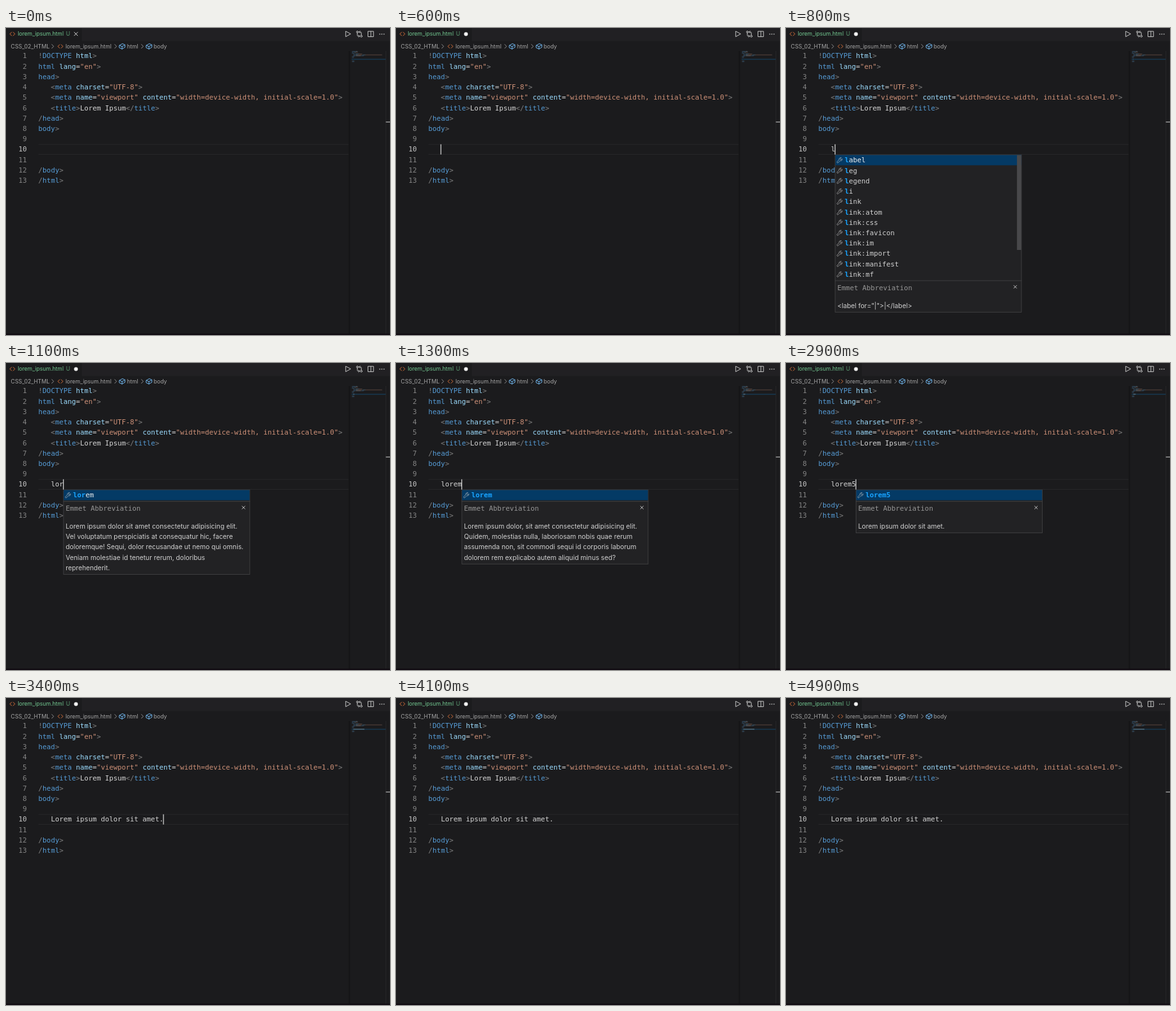
Write an HTML page that moves like this. It is 600 px wide and 480 px high and loops after 5000 ms.

```html
<!DOCTYPE html>
<html lang="en">
<head>
<meta charset="UTF-8">
<title>Editor typing loop</title>
<style>
html, body { margin: 0; width: 100%; height: 100%; overflow: hidden; background: #1b1b1d; }
svg { display: block; width: 600px; height: 480px; }
text { white-space: pre; }
.mono { font: 10.82px "DejaVu Sans Mono", monospace; }
.ui { font: 8.63px Inter, sans-serif; }
.doc { font: 10.3px Inter, sans-serif; fill: #d0d0d0; }
.line { fill: none; stroke-width: 1; stroke-linejoin: round; stroke-linecap: round; }
</style>
</head>
<body>
<svg id="stage" viewBox="0 0 600 480" xmlns="http://www.w3.org/2000/svg"></svg>
<script>
const NS = "http://www.w3.org/2000/svg";
const stage = document.getElementById("stage");
const LOOP = 5000, CHAR = 6.514, ROW = 16.22, LEFT = 50.6, BASE = 47.4, INDENT = 3;
const COLORS = { g: "#808080", b: "#569cd6", a: "#9cdcfe", s: "#ce9178", t: "#d4d4d4" };

// First character of each token selects its colour.
const CODE = [
  ["g!", "bDOCTYPE", "a html", "g>"],
  ["bhtml", "a lang", "t=", 's"en"', "g>"],
  ["bhead", "g>"],
  ["g   <", "bmeta", "a charset", "t=", 's"UTF-8"', "g>"],
  ["g   <", "bmeta", "a name", "t=", 's"viewport"', "a content", "t=",
    's"width=device-width, initial-scale=1.0"', "g>"],
  ["g   <", "btitle", "g>", "tLorem Ipsum", "g</", "btitle", "g>"],
  ["g/", "bhead", "g>"],
  ["bbody", "g>"],
  [], [], [],
  ["g/", "bbody", "g>"],
  ["g/", "bhtml", "g>"]
];

const TAGS = ["label", "leg", "legend", "li", "link", "link:atom", "link:css", "link:favicon",
  "link:im", "link:import", "link:manifest", "link:mf"];
const LONG = [
  "Lorem ipsum dolor sit amet consectetur adipisicing elit.",
  "Vel voluptatum perspiciatis at consequatur hic, facere",
  "doloremque! Sequi, dolor recusandae ut nemo qui omnis.",
  "Veniam molestiae id tenetur rerum, doloribus",
  "reprehenderit."
];
const MEDIUM = [
  "Lorem ipsum dolor, sit amet consectetur adipisicing elit.",
  "Quidem, molestias nulla, laboriosam nobis quae rerum",
  "assumenda non, sit commodi sequi id corporis laborum",
  "dolorem rem explicabo autem aliquid minus sed?"
];
const SHORT = "Lorem ipsum dolor sit amet.";

// Typing steps; blink is the moment the caret's blink cycle starts.
const STEPS = [
  { at: 0, blink: -800, col: 0, text: "" },
  { at: 600, col: INDENT, text: "" },
  { at: 700, text: "l", items: TAGS, doc: ['<label for="|">|</label>'] },
  { at: 1000, text: "lo", items: ["lorem"], doc: LONG },
  { at: 1100, text: "lor", items: ["lorem"], doc: LONG },
  { at: 1200, text: "lore", items: ["lorem"], doc: LONG },
  { at: 1300, text: "lorem", items: ["lorem"], doc: MEDIUM },
  { at: 1900, text: "lorem5", items: ["lorem5"], doc: [SHORT] },
  { at: 3200, text: SHORT }
];

function add(parent, tag, attrs, content) {
  const el = document.createElementNS(NS, tag);
  for (const key in attrs) el.setAttribute(key, attrs[key]);
  if (content !== undefined) el.textContent = content;
  parent.appendChild(el);
  return el;
}
const rect = (p, x, y, width, height, fill) => add(p, "rect", { x, y, width, height, fill });
const path = (p, d, stroke, extra) => add(p, "path", { class: "line", d, stroke, ...extra });
const write = (p, x, y, cls, fill, str) => add(p, "text", { x, y, class: cls, fill }, str);

function codeIcon(x, y) {
  path(stage, `M${x - 1.3} ${y - 2.7}l-2.6 2.7 2.6 2.7M${x + 1.3} ${y - 2.7}l2.6 2.7-2.6 2.7`, "#d9713a");
}
function chevron(x) {
  path(stage, `M${x - 1.4} 25.7l2.9 3-2.9 3`, "#8c8c8c", { "stroke-width": 0.9 });
}
function cube(x) {
  path(stage, `M${x - 4.2} 27.2l4.6-2.7 4 1.9v3.7l-4.6 2.8-4-2zl4 1.9 4.6-2.7M${x - 0.2} 29.1v3.8`,
    "#6fb5ec", { "stroke-width": 0.9 });
}
function cross(p, x, y, r, color) {
  return path(p, `M${x - r} ${y - r}l${2 * r} ${2 * r}m0 ${-2 * r}l${-2 * r} ${2 * r}`, color);
}
function wrench(p, x, y) {
  path(p, "M10.5 1.5a4 4 0 0 0-3.8 5.3L1.8 11.7a1.8 1.8 0 0 0 2.5 2.5L9.2 9.3a4 4 0 0 0 5.2-5l-2.4 2.4-2-.6-.6-2 2.4-2.4z",
    "#c8c8c8", { transform: `translate(${x} ${y}) scale(.62)`, "stroke-width": 1.4 });
}

function drawHeader() {
  rect(stage, 118.5, 0, 481.5, 20.5, "#212023");
  codeIcon(10, 9.3);
  write(stage, 18.2, 12.4, "ui", "#73c991", "lorem_ipsum.html");
  write(stage, 93.8, 12.4, "ui", "#5a9a70", "U");
  path(stage, "M530.8 5.4v8.2l7.4-4.1z", "#c5c5c5");
  const compare = add(stage, "g", { class: "line", stroke: "#c5c5c5" });
  for (const [cx, cy] of [[549, 6.2], [555.2, 12.8]]) add(compare, "circle", { cx, cy, r: 1.4 });
  add(compare, "path", { d: "M549 7.8v3.6q0 1.4 1.4 1.4h2m-1.4-1.5 1.5 1.5-1.5 1.5M555.2 11.2v-3.6q0-1.4-1.4-1.4h-2m1.4-1.5-1.5 1.5 1.5 1.5" });
  path(stage, "M566 5.2h8.2v8.4h-8.2zM570.1 5.2v8.4", "#c5c5c5");
  for (const cx of [584, 587.3, 590.6]) add(stage, "circle", { cx, cy: 9.5, r: 0.85, fill: "#c5c5c5" });

  const crumb = (x, str) => write(stage, x, 31.8, "ui", "#a6a6a6", str);
  crumb(7.6, "CSS_02_HTML");
  crumb(93, "lorem_ipsum.html");
  crumb(189, "html");
  crumb(230.7, "body");
  [73, 171.3, 213].forEach(chevron);
  codeIcon(85, 28.7);
  [181.5, 223.5].forEach(cube);
}

function drawCode() {
  rect(stage, LEFT, 181.6, 485, 0.9, "#29292b");
  rect(stage, LEFT, 197, 485, 0.9, "#29292b");
  rect(stage, 535.6, 36, 1.8, 442, "#141416");
  rect(stage, 593.3, 36, 0.8, 442, "#29292b");
  rect(stage, 593.5, 146.3, 6.5, 1.4, "#a0a0a0");
  rect(stage, 540, 48.2, 53.3, 1.4, "#173a54");
  rect(stage, 0, 477.8, 600, 2.2, "#110b12");

  CODE.forEach((tokens, i) => {
    const y = BASE + i * ROW;
    add(stage, "text", { x: 32.6, y, class: "mono", "text-anchor": "end",
      fill: i === 9 ? "#c6c6c6" : "#858585" }, i + 1);
    const row = add(stage, "text", { x: LEFT, y, class: "mono" });
    let col = 0;
    for (const token of tokens) {
      const str = token.slice(1), fill = COLORS[token[0]], used = str.trimStart().length;
      add(row, "tspan", { fill }, str);
      const start = col + str.length - used;
      rect(stage, 540.5 + start * 0.65, 36.2 + i * 1.35, used * 0.65, 0.9, fill)
        .setAttribute("opacity", 0.38);
      col += str.length;
    }
  });
}

function makePopup(step) {
  const g = add(stage, "g", { visibility: "hidden" });
  const x = LEFT + CHAR * (INDENT + step.text.length) - 0.3, y = 198, w = 292;
  const many = step.items.length > 1;
  const split = many ? 395 : 216.3;
  const bottom = split + 33.6 + ROW * step.doc.length;
  add(g, "rect", { x: x + 0.5, y: y + 0.4, width: w - 1, height: bottom - y - 0.9,
    fill: "#222224", stroke: "#414143", "stroke-width": 0.9 });
  rect(g, x + 0.8, y + 0.6, w - 1.6, 16, "#043a65");
  step.items.forEach((item, i) => {
    wrench(g, x + 2.4, 201.8 + i * ROW);
    const label = add(g, "text", { x: x + 15.4, y: 210.4 + i * ROW, class: "mono" });
    const n = step.text.length;
    add(label, "tspan", { fill: "#18a3ff", "font-weight": "bold" }, item.slice(0, n));
    add(label, "tspan", { fill: i ? "#d0d0d0" : "#f0f0f0" }, item.slice(n));
  });
  if (many) rect(g, x + w - 7.5, 199, 6.8, 148, "#48484a");
  rect(g, x, split - 0.4, w, 0.9, "#414143");
  write(g, x + 3.8, split + 15, "mono", "#969696", "Emmet Abbreviation");
  cross(g, x + w - 10.2, split + 9.7, 2.2, "#c0c0c0");
  step.doc.forEach((str, i) =>
    add(g, "text", { x: x + 3.8, y: split + 42.6 + i * ROW, class: "doc" }, str));
  return g;
}

drawHeader();
drawCode();
const closeMark = cross(stage, 109.3, 9.3, 2.6, "#d8d8d8");
const dirtyDot = add(stage, "circle", { cx: 109.3, cy: 9.4, r: 3, fill: "#f0f0f0" });
const typed = write(stage, LEFT + INDENT * CHAR, BASE + 9 * ROW, "mono", "#d4d4d4", "");
const typedMap = rect(stage, 540.5 + INDENT * 0.65, 48.35, 0, 0.9, "#6f8796");
const popups = STEPS.map(step => step.items ? makePopup(step) : null);
const caret = rect(stage, 0, 181.8, 1.2, 16, "#dcdcdc");

const show = (el, on) => el.setAttribute("visibility", on ? "visible" : "hidden");

function render(t) {
  let now = 0;
  STEPS.forEach((step, i) => { if (t >= step.at) now = i; });
  const { at, blink = at, col = INDENT, text } = STEPS[now];
  if (typed.textContent !== text) typed.textContent = text;
  typedMap.setAttribute("width", text.length * 0.65);
  caret.setAttribute("x", LEFT + CHAR * (col + text.length) - 0.6);
  show(caret, (t - blink) % 1000 < 500);
  show(closeMark, now === 0);
  show(dirtyDot, now > 0);
  popups.forEach((popup, i) => { if (popup) show(popup, i === now); });
}

const begin = performance.now();
function tick() {
  render((performance.now() - begin) % LOOP);
  requestAnimationFrame(tick);
}
render(0);
requestAnimationFrame(tick);
</script>
</body>
</html>
```
